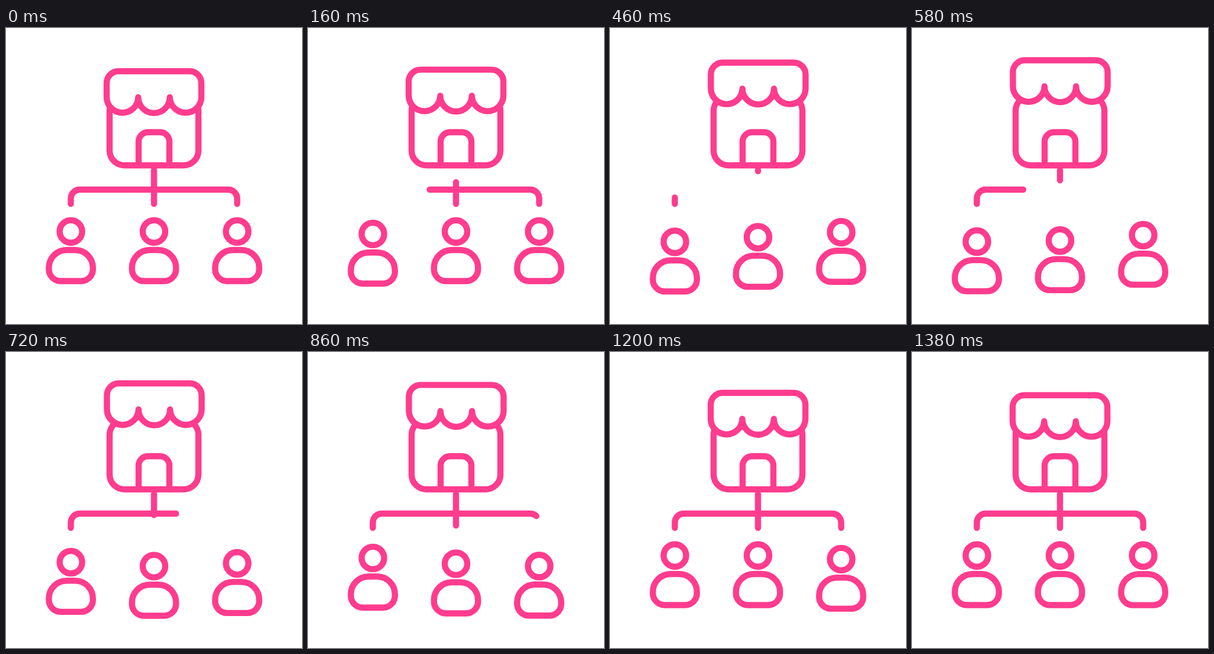
An HTML page for the animation above (1400 ms loop, 500 px wide and 500 px high).

```html
<!DOCTYPE html>
<html lang="en">
<head>
<meta charset="utf-8">
<title>Store network</title>
<style>
  html, body { margin: 0; width: 100%; height: 100%; overflow: hidden; background: #fff; }
  svg { display: block; width: 100%; height: 100%; }
  .ink { fill: none; stroke: #ff3c8e; stroke-width: 10.4; stroke-linecap: round; stroke-linejoin: round; }
</style>
</head>
<body>
<svg viewBox="0 0 500 500">
  <defs>
    <g id="person">
      <circle cy="343.7" r="19"/>
      <path d="M-37.2 405a30 30 0 0 1 30-30H7.2a30 30 0 0 1 30 30v2.5a20 20 0 0 1-20 20h-34.4a20 20 0 0 1-20-20z"/>
    </g>
  </defs>
  <g class="ink">
    <path d="M187.5 118.3A25 25 0 0 0 175 140V207a25 25 0 0 0 25 25H300a25 25 0 0 0 25-25V140A25 25 0 0 0 312.5 118.3"/>
    <path d="M224 232V192a16 16 0 0 1 16-16h20a16 16 0 0 1 16 16v40"/>
    <path id="awning" fill="#fff" d="M190 73H310a20 20 0 0 1 20 20V117a26.67 26.67 0 0 1-53.33 0a26.67 26.67 0 0 1-53.34 0a26.67 26.67 0 0 1-53.33 0V93a20 20 0 0 1 20-20z"/>
    <path class="wire" pathLength="1" d="M250 240V297"/>
    <path class="wire" pathLength="1" d="M109.5 297V288a15 15 0 0 1 15-15H375.5a15 15 0 0 1 15 15V297"/>
    <use class="person" href="#person"/>
    <use class="person" href="#person"/>
    <use class="person" href="#person"/>
  </g>
</svg>
<script>
  const LOOP = 1400, STEP = 20;
  const WIRE = 445;              // time to erase, then to redraw
  const BOB = 510, DROP = 18;
  const people = [[109.6, 0], [250, 193], [390.5, 380]];   // x, delay

  const awning = document.getElementById('awning');
  const wires = document.querySelectorAll('.wire');
  const figures = document.querySelectorAll('.person');

  const clamp = v => Math.min(1, Math.max(0, v));
  const ease = v => v * v * (3 - 2 * v);
  // 0 -> 1 -> 0, each half lasting `half` ms
  const bump = (t, half) => ease(clamp(1 - Math.abs(t / half - 1)));

  function draw(t) {
    const lift = bump(t, LOOP / 2);
    awning.setAttribute('transform', `translate(${0.5 * lift} ${-20 * lift})`);

    const from = t < WIRE ? t / WIRE : 0;
    const to = t < WIRE ? 1 : clamp(t / WIRE - 1);
    const len = to - from;
    for (const w of wires) {
      w.style.visibility = len > 0.002 ? 'visible' : 'hidden';
      w.style.strokeDasharray = `${len} 2`;
      w.style.strokeDashoffset = -from;
    }

    people.forEach(([x, delay], i) => {
      figures[i].setAttribute('transform', `translate(${x} ${DROP * bump(t - delay, BOB)})`);
    });
  }

  const start = performance.now();
  function tick() {
    const t = (performance.now() - start + 0.5) % LOOP;
    draw(Math.floor(t / STEP) * STEP);
    requestAnimationFrame(tick);
  }
  tick();
</script>
</body>
</html>
```
